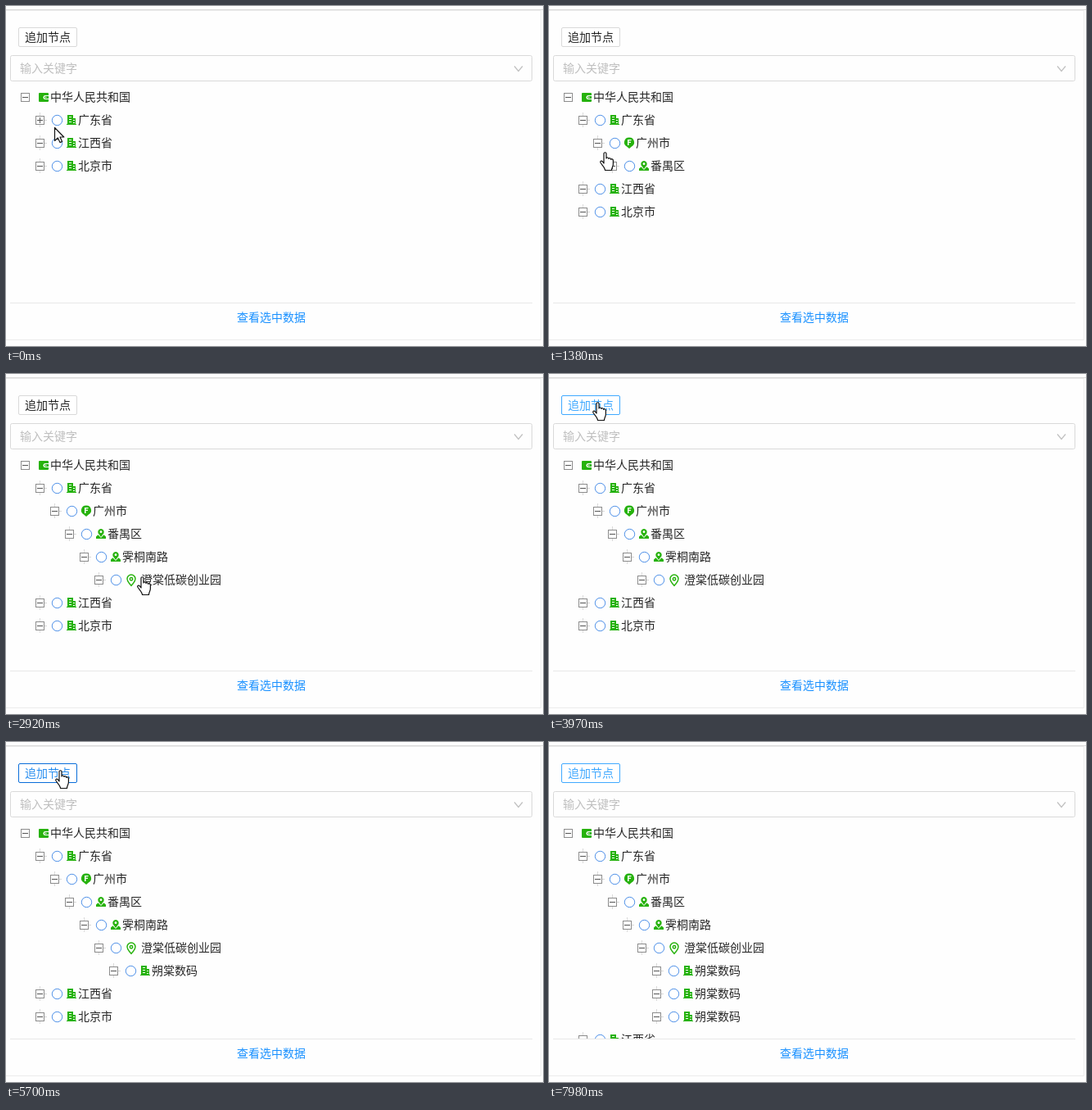
Write an HTML page that moves like this. It is 656 px wide and 415 px high and loops after 9.13 s.

```html
<!DOCTYPE html>
<html lang="zh-CN">
<head>
<meta charset="utf-8">
<style>
html, body { margin: 0; width: 100%; height: 100%; overflow: hidden; background: #fefefe; }
svg { display: block; width: 656px; height: 415px; }
text { font: 14px "Noto Sans CJK SC", "Noto Sans CJK", sans-serif; fill: #262626; }
.line { fill: none; stroke: #d9d9d9; }
.faint { fill: none; stroke: #ebebeb; }
.box { fill: #fff; stroke: #8c8c8c; }
.sign { stroke: #555; }
.radio { fill: #fff; stroke: #4c8fe8; }
.icon { fill: #26b20c; }
.hole { fill: #fefefe; }
.cursor { fill: #fff; stroke: #111; stroke-width: 1.2; stroke-linejoin: round; }
</style>
</head>
<body>
<svg viewBox="0 0 656 415">
  <defs>
    <!-- icons are centred on their row, starting at x = 0 -->
    <g id="wallet" class="icon">
      <rect y="-5" width="12" height="11" rx="1"/>
      <path class="hole" d="M12-2H8a2 2 0 0 0 0 5h4z"/>
      <path d="M12-1H8.5a1.4 1.4 0 0 0 0 3H12z"/>
      <circle class="hole" cx="8.7" cy=".5" r=".8"/>
    </g>
    <g id="building" class="icon">
      <path d="M1-6H8V-2H11V5H12V6H0V5H1z"/>
      <path class="hole" d="M3-4H6V-3H3zM3-1H6V0H3zM3 2H6V3H3zM8 0H10V1H8zM8 3H10V4H8z"/>
    </g>
    <g id="badge" class="icon">
      <path d="M6-6.5A5.8 5.8 0 0 1 9 4.4L6 7 3 4.4A5.8 5.8 0 0 1 6-6.5z"/>
      <path class="hole" d="M4-4H8.5V-2.7H5.5V-1.3H8V0H5.5V3H4z"/>
    </g>
    <g id="place" class="icon">
      <path d="M6-6A3.8 3.8 0 0 1 9.4-.7L6 4 2.6-.7A3.8 3.8 0 0 1 6-6z"/>
      <path d="M2.5 1.2 0 3.5V6H12V3.5L9.5 1.2 6 5z"/>
      <circle class="hole" cx="6" cy="-2.3" r="1.4"/>
    </g>
    <g id="pin" fill="none" stroke="#26b20c" stroke-width="1.5">
      <path d="M7-6A5 5 0 0 1 12-1C12 2 9 5 7 7.3 5 5 2 2 2-1A5 5 0 0 1 7-6z"/>
      <circle cx="7" cy="-.8" r="1.7"/>
    </g>
    <path id="arrow" class="cursor" d="M.5.5V16.5L4.3 13 7 18.6 9.6 17.5 7 12H11.8z"/>
    <path id="hand" class="cursor" d="M5 14V2.3C5 .2 8 .2 8 2.3V8C8 6.5 11 6.6 11 8.5 11.2 7.2 13.7 7.4 13.7 9.4 14 8.3 16.4 8.6 16.4 10.5V15C16.4 18 14.5 19 14.5 22.5H6.5C6.5 19.5 3 16.5 1 13.3 0 11.4 2 10.3 3.4 11.8z"/>
    <clipPath id="treeArea"><rect y="94" width="656" height="268"/></clipPath>
  </defs>

  <path class="line" d="M0 4.5H656"/>
  <path class="faint" d="M0 5.5H653.5V407.5H0"/>
  <rect id="wave" x="13" y="24" width="76" height="28" rx="4" fill="none" stroke="#1890ff" stroke-width="4" opacity=".1"/>
  <rect id="button" x="15.5" y="26.5" width="71" height="23" rx="1.5" fill="#fff"/>
  <text id="buttonLabel" x="23" y="43">追加节点</text>
  <rect class="line" x="5.5" y="60.5" width="637" height="31" rx="2"/>
  <text x="17" y="81" style="fill:#bfbfbf">输入关键字</text>
  <path d="M621 73.5 626 79.5 631 73.5" fill="none" stroke="#bfbfbf" stroke-width="1.2"/>
  <g id="tree" clip-path="url(#treeArea)"></g>
  <path d="M5 362.5H643" stroke="#e8e8e8"/>
  <text x="282" y="385" style="fill:#1890ff">查看选中数据</text>
  <use id="cursor"/>
</svg>
<script>
const LOOP = 9130, ROW = 28, INDENT = 18;
const byId = id => document.getElementById(id);

// depth, icon, label, time it appears, time it opens
const nodes = [
  [0, 'wallet', '中华人民共和国', 0, 0],
  [1, 'building', '广东省', 0, 390],
  [2, 'badge', '广州市', 390, 1230],
  [3, 'place', '番禺区', 1230, 1810],
  [4, 'place', '霁桐南路', 1810, 2200],
  [5, 'pin', '澄棠低碳创业园', 2200, 0],
  [6, 'building', '朔棠数码', 4240, 0],
  [6, 'building', '朔棠数码', 5850, 0],
  [6, 'building', '朔棠数码', 7140, 0],
  [1, 'building', '江西省', 0, 0],
  [1, 'building', '北京市', 0, 0]
].map(([depth, icon, label, appears, opens]) => ({ depth, icon, label, appears, opens }));

// time, x, y, shape
const cursorPath = [
  [0, 59, 148, 'arrow'], [120, 48, 143, 'arrow'], [270, 34, 138, 'hand'],
  [540, 40, 148, 'hand'], [660, 58, 171, 'hand'], [810, 72, 187, 'hand'],
  [960, 62, 176, 'hand'], [1080, 54, 166, 'hand'], [1380, 62, 178, 'hand'],
  [1530, 72, 193, 'hand'], [1930, 97, 214, 'hand'], [2080, 91, 220, 'hand'],
  [2350, 128, 236, 'hand'], [2500, 186, 250, 'hand'], [2650, 227, 257, 'hand'],
  [2920, 160, 247, 'hand'], [3040, 150, 235, 'hand'], [3190, 132, 205, 'hand'],
  [3310, 113, 164, 'arrow'], [3460, 96, 122, 'arrow'], [3580, 81, 84, 'arrow'],
  [3730, 67, 55, 'arrow'], [3850, 57, 38, 'hand'], [3970, 53, 34, 'hand'],
  [4810, 60, 34, 'hand'], [7830, 124, 179, 'arrow'], [7980, 0, 0, '']
];

// time, border, label colour, click ripple
const idle = ['#d9d9d9', '#262626', 0], hover = ['#40a9ff', '#40a9ff', 0];
const pressed = ['#096dd9', '#2b8fef', 0], rippling = ['#40a9ff', '#40a9ff', 1];
const buttonStates = [
  [0, ...idle], [3850, ...hover], [4120, ...pressed], [4240, ...rippling],
  [4360, ...hover], [5700, ...pressed], [5850, ...rippling], [6300, ...hover],
  [7140, ...rippling], [7440, ...hover]
];

function nodeMarkup({ depth, icon, label }) {
  const left = depth * INDENT, x = depth ? 56 + left : 40;
  const textX = x + (icon === 'pin' ? 19 : 14);
  return `<g>
    ${depth ? `<path class="line" d="M${23.5 + left}-9V9M${29 + left} .5h3"/>
    <circle class="radio" cx="${44.5 + left}" cy=".5" r="6.2"/>` : ''}
    <rect class="box" x="${18.5 + left}" y="-4.5" width="10" height="10"/>
    <path class="sign" d="M${20 + left} .5h7"/>
    <path class="sign plus" d="M${23.5 + left}-3v7"/>
    <use href="#${icon}" x="${x}"/>
    <text x="${textX}" y="5">${label}</text>
  </g>`;
}

byId('tree').innerHTML = nodes.map(nodeMarkup).join('');
nodes.forEach((node, i) => {
  node.group = byId('tree').children[i];
  node.plus = node.group.querySelector('.plus');
});

const current = (steps, time) => steps.findLast(step => step[0] <= time);
const show = (element, visible) => element.setAttribute('visibility', visible ? 'inherit' : 'hidden');

function render(time) {
  let row = 0;
  for (const { group, plus, appears, opens } of nodes) {
    const visible = time >= appears;
    show(group, visible);
    show(plus, visible && time < opens);
    if (visible) group.setAttribute('transform', `translate(0 ${111 + ROW * row++})`);
  }
  const [, border, color, ripple] = current(buttonStates, time);
  byId('button').setAttribute('stroke', border);
  byId('buttonLabel').style.fill = color;
  show(byId('wave'), ripple);

  const [, x, y, shape] = current(cursorPath, time);
  show(byId('cursor'), shape);
  byId('cursor').setAttribute('href', '#' + shape);
  byId('cursor').setAttribute('transform', `translate(${x} ${y})`);
}

const start = performance.now();
function tick() {
  render((performance.now() - start) % LOOP);
  requestAnimationFrame(tick);
}
tick();
</script>
</body>
</html>
```
